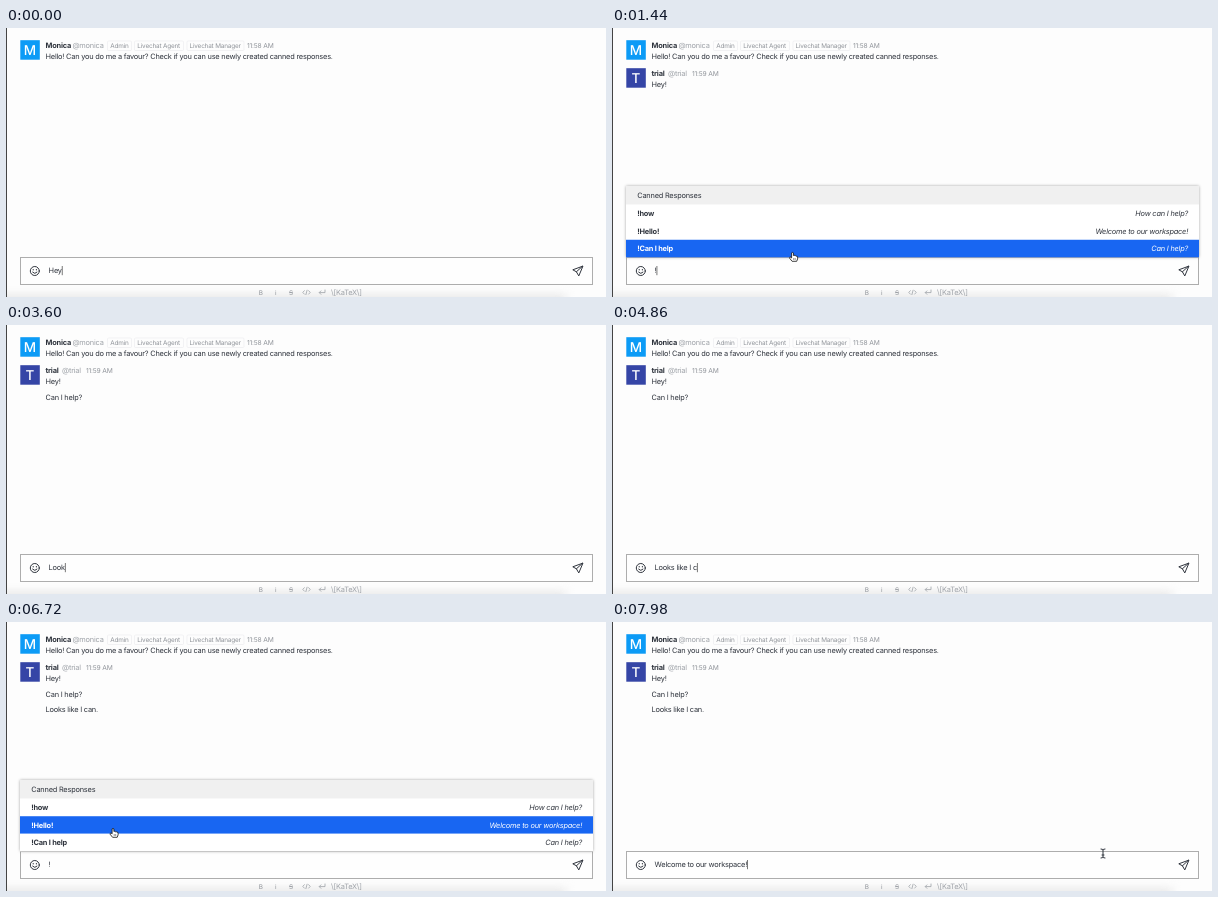
Recreate the animation shown at these times as an HTML page. Size 600 by 269 pixels, loop 8000 ms.

```html
<!DOCTYPE html>
<html lang="en">
<head>
<meta charset="utf-8">
<title>Canned responses</title>
<style>
html, body { margin: 0; width: 100%; height: 100%; overflow: hidden; background: #fdfdfd; }
svg { display: block; width: 600px; height: 269px; }
text { font: 7.4px Inter, "Liberation Sans", sans-serif; letter-spacing: -.028em; fill: #2f343d; white-space: pre; text-rendering: geometricPrecision; }
.bold { font-weight: 700; }
.dim { fill: #9ea2a8; }
.small { font-size: 6.4px; fill: #8f9399; }
.time { font-size: 6.7px; fill: #8f9399; }
.letter { font-size: 13.5px; font-weight: 500; letter-spacing: 0; fill: #fff; text-anchor: middle; }
.badge { fill: none; stroke: #ededef; stroke-width: .7; }
.reply { font-style: italic; text-anchor: end; }
.line { fill: none; stroke: #2f343d; stroke-linecap: round; stroke-linejoin: round; }
.tool { fill: none; stroke: #9ea2a8; stroke-width: .8; }
.shade { fill: #e6e6e6; filter: blur(5px); }
.panel { filter: drop-shadow(0 0 1.5px rgba(0, 0, 0, .35)); }
.row rect { fill: #fff; }
.row.on rect { fill: #1866f2; }
.row.on text { fill: #fff; }
</style>
</head>
<body>
<svg viewBox="0 0 600 269">
  <rect width="600" height="269" fill="#fdfdfd"/>
  <rect class="shade" x="-20" y="267" width="580" height="20"/>
  <rect width="1" height="269" fill="#444"/>

  <rect x="14.3" y="12.2" width="19.5" height="19.5" fill="#0c9bf6"/>
  <text class="letter" x="24" y="26.7">M</text>
  <text class="bold" x="39.5" y="20">Monica</text>
  <text class="dim" x="66.4" y="20">@monica</text>
  <rect class="badge" x="101.5" y="13" width="24" height="9.5" rx="1"/>
  <text class="small" x="104.3" y="20">Admin</text>
  <rect class="badge" x="128.5" y="13" width="49" height="9.5" rx="1"/>
  <text class="small" x="131.3" y="20">Livechat Agent</text>
  <rect class="badge" x="181" y="13" width="57" height="9.5" rx="1"/>
  <text class="small" x="183.5" y="20">Livechat Manager</text>
  <text class="time" x="241" y="20">11:58 AM</text>
  <text x="39.5" y="31">Hello! Can you do me a favour? Check if you can use newly created canned responses.</text>

  <g data-from="420">
    <rect x="14.3" y="40.2" width="19.5" height="19.5" fill="#3545a6"/>
    <text class="letter" x="24" y="54.8">T</text>
    <text class="bold" x="39.5" y="48.3">trial</text>
    <text class="dim" x="56" y="48.3">@trial</text>
    <text class="time" x="80" y="48.3">11:59 AM</text>
    <text x="39.5" y="59.3">Hey!</text>
  </g>
  <text data-from="2640" x="39.5" y="74.6">Can I help?</text>
  <text data-from="5580" x="39.5" y="90">Looks like I can.</text>

  <rect x="14.5" y="229.5" width="572" height="27" fill="#fefefe" stroke="#adadad"/>
  <g class="line">
    <circle cx="28.8" cy="243" r="4.5"/>
    <path d="M26.6 244.2Q28.8 246.8 31 244.2"/>
    <path d="M27.2 241.5v.3M30.4 241.5v.3" stroke-width="1.2"/>
  </g>
  <path id="send" class="line" d="M576.6 238.2L566.8 241.8L570.4 243.8L572.6 247.6Z M576.6 238.2L570.4 243.8"/>
  <text id="draft" x="42.6" y="245.3"></text>
  <rect id="caret" y="238" width=".8" height="9.2" fill="#555"/>

  <text class="small" font-weight="600" x="252.8" y="266.6">B</text>
  <text class="small" x="269" y="266.6">i</text>
  <text class="small" x="283" y="266.6" text-decoration="line-through">S</text>
  <path class="tool" d="M298.6 262.4L296.8 264.4L298.6 266.4M302.4 262.4L304.2 264.4L302.4 266.4M301.2 261.8L299.8 267"/>
  <path class="tool" d="M319 261.6V264.6H313.2M315.2 262.6L313.2 264.6L315.2 266.6"/>
  <text class="dim" x="325" y="267">\[KaTeX\]</text>

  <g id="popup">
    <rect class="panel" x="14" y="158" width="573" height="71.3" rx="1" fill="#fff"/>
    <rect x="14" y="158" width="573" height="18.7" fill="#f0f0f0"/>
    <text x="25.2" y="170.3">Canned Responses</text>
  </g>

  <g id="hand">
    <path d="M-.9 .4Q0 -.6 .9 .4V3Q1.8 2.4 2.5 3.3Q3.4 2.8 3.9 3.7Q5 3.4 5.1 4.6V6.4L4.2 8.8H-.4L-3 5.6Q-3 4.2 -1.7 4.7L-.9 5.4Z" fill="#fff" stroke="#111" stroke-width=".8" stroke-linejoin="round"/>
    <path d="M1.2 5.6V7.4M2.7 5.6V7.4" stroke="#111" stroke-width=".5"/>
  </g>
  <path id="beam" class="line" stroke-width="1" d="M-2 -4.5Q0 -4.5 0 -3.4Q0 -4.5 2 -4.5M0 -3.4V3.4M-2 4.5Q0 4.5 0 3.4Q0 4.5 2 4.5M-1 1.5H1"/>
</svg>
<script>
const LOOP = 8000, BLINK = 240, TICK = 60;
const ROW_TOP = 176.7, ROW_H = 17.53;
const $ = id => document.getElementById(id);
const draft = $('draft'), caret = $('caret'), popup = $('popup');
const sent = [...document.querySelectorAll('[data-from]')];

const rows = [
  ['!how', 'How can I help?'],
  ['!Hello!', 'Welcome to our workspace!'],
  ['!Can I help', 'Can I help?']
].map(([key, reply], i) => {
  const y = ROW_TOP + i * ROW_H;
  popup.insertAdjacentHTML('beforeend',
    `<g class="row"><rect x="14" y="${y}" width="573" height="${ROW_H}"/>
     <text class="bold" x="25.2" y="${y + 11.3}">${key}</text>
     <text class="reply" x="576.1" y="${y + 11.3}">${reply}</text></g>`);
  return popup.lastElementChild;
});

// One time per typed character.
const typing = (text, from, times) => times.map((t, i) => [t, text.slice(0, from + i + 1)]);
const edits = [
  [0, 'Hey'], [180, 'Hey!'], [360, ''],
  [840, '!'], [1560, 'Can I help?'], [2580, ''],
  ...typing('Looks', 0, [3240, 3360, 3480, 3600, 3720]),
  ...typing('Looks like I can.', 5,
    [4320, 4380, 4440, 4500, 4560, 4620, 4740, 4800, 4860, 4980, 5100, 5160]),
  [5520, ''], [6360, '!'], [6960, 'Welcome to our workspace!']
];
const menus = [[900, 1560], [6420, 6960]];

// Pointer strokes: time, x, y; each is visible until its end.
const strokes = [
  { end: 2580, path: [[1320, 186, 245], [1440, 180.5, 224.5], [1560, 180.5, 224.5], [1800, 100, 243]] },
  { end: 6360, path: [[6000, 100, 243]] },
  { end: 8000, path: [[6480, 100, 243], [6720, 107, 206.5], [6960, 107, 206.5], [7440, 140, 238],
                      [7620, 140, 238], [7800, 320, 262], [7980, 491, 231.5]] }
];

const ease = k => k * k * (3 - 2 * k);
const show = (el, on) => { el.style.display = on ? '' : 'none'; };

function pointer(t) {
  const s = strokes.find(s => t >= s.path[0][0] && t < s.end);
  if (!s) return null;
  const i = s.path.findLastIndex(p => p[0] <= t);
  const a = s.path[i], b = s.path[i + 1];
  if (!b) return { x: a[1], y: a[2] };
  const k = ease((t - a[0]) / (b[0] - a[0]));
  return { x: a[1] + (b[1] - a[1]) * k, y: a[2] + (b[2] - a[2]) * k };
}

function render(t) {
  const [since, text] = edits.findLast(e => e[0] <= t);
  if (draft.textContent !== text) draft.textContent = text;
  show($('send'), text);
  show(caret, Math.floor((t - since) / BLINK) % 2 === 0);
  caret.setAttribute('x', 42.6 + (text ? draft.getComputedTextLength() : 0));
  sent.forEach(el => show(el, t >= +el.dataset.from));

  const open = menus.some(([a, b]) => t >= a && t < b);
  const p = pointer(Math.floor(t / TICK) * TICK);
  const hover = p ? Math.floor((p.y - ROW_TOP) / ROW_H) : 0;
  const active = hover >= 0 && hover < rows.length ? hover : 0;
  const overMenu = open && p && hover < rows.length;
  show(popup, open);
  rows.forEach((row, i) => row.classList.toggle('on', i === active));
  show($('hand'), overMenu);
  show($('beam'), p && !overMenu);
  if (p) for (const id of ['hand', 'beam']) $(id).setAttribute('transform', `translate(${p.x} ${p.y})`);
}

const start = performance.now();
function frame() {
  render((performance.now() - start) % LOOP);
  requestAnimationFrame(frame);
}
frame();
</script>
</body>
</html>
```
